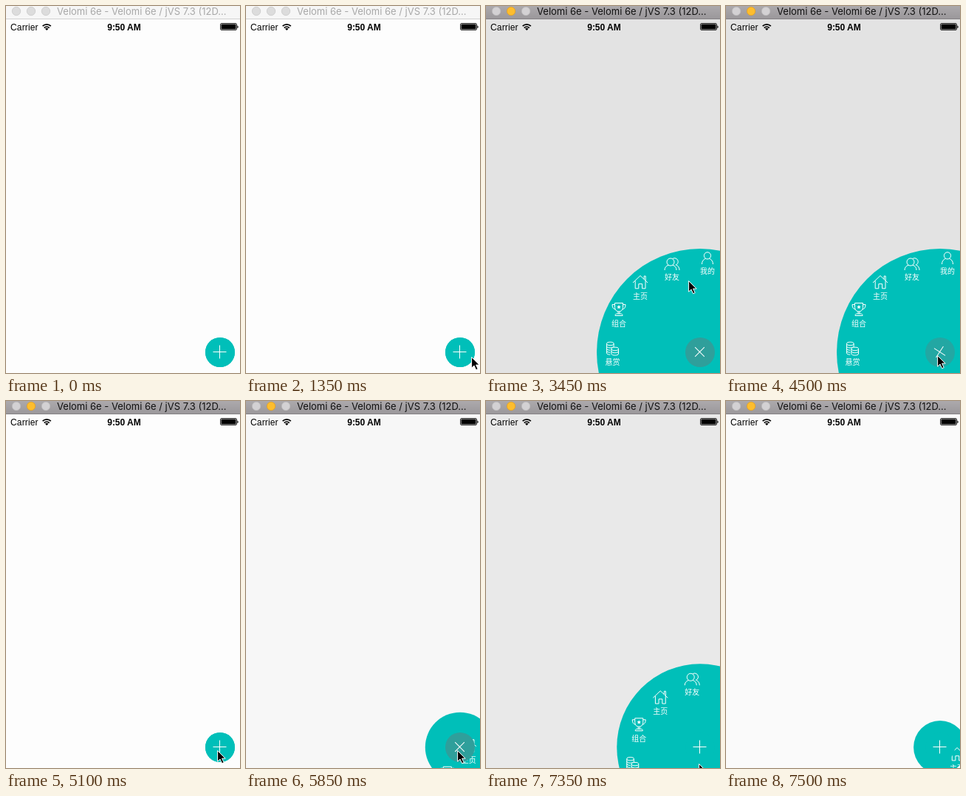
An HTML page that plays this animation: 317 px wide and 496 px high, repeating every 7.6 s.

```html
<!DOCTYPE html>
<html lang="zh">
<head>
<meta charset="utf-8">
<title>Radial menu</title>
<style>
  html, body { margin: 0; width: 100%; height: 100%; overflow: hidden; background: #fdfdfd; }
  svg { display: block; }
  .title { font: 13px Inter, sans-serif; }
  .status { font: 12px "Liberation Sans", Arial, sans-serif; }
  .clock { font-weight: bold; text-anchor: middle; }
  .label { font: 10px "Noto Sans CJK SC", "Noto Sans CJK", sans-serif; fill: #fff; text-anchor: middle; }
  .line { fill: none; stroke: #fff; stroke-width: 1; stroke-linejoin: round; }
</style>
</head>
<body>
<svg width="317" height="496" viewBox="0 0 317 496">
  <defs>
    <linearGradient id="steel" x2="0" y2="1">
      <stop stop-color="#aca9ac"/><stop offset="1" stop-color="#9b989b"/>
    </linearGradient>
    <clipPath id="clip"><circle id="clipDisc" cx="290" cy="468"/></clipPath>

    <g id="me">
      <circle cy="-3.6" r="4.6"/>
      <path d="M-7.5 8C-7.5 4-5.5 1.6-2.6.3M2.6.3C5.5 1.6 7.5 4 7.5 8"/>
    </g>
    <g id="friends">
      <circle cx="-2" cy="-3" r="5"/>
      <path d="M-10 8C-10 4.5-8 2.3-5 1.2M1 1.2C4 2.3 6 4.5 6 8"/>
      <path d="M1-7.6A4.8 4.8 0 1 1 4.6 1.2M6 1.2C8.8 2.6 10 5 10 8"/>
    </g>
    <g id="home">
      <path d="M-10 1L0-8.5L10 1M5.2-4V-8H7.2V-2"/>
      <path d="M-6.8-1.5V8.8H-2.2V2.6H2.6V8.8H7V-1.5"/>
    </g>
    <g id="cup">
      <path d="M-5.5-8.5H5.5V-2.5A5.5 5.5 0 0 1-5.5-2.5ZM-5.5-6.5H-9C-9-2.5-7.5-.5-4.8 0M5.5-6.5H9C9-2.5 7.5-.5 4.8 0"/>
      <path d="M-1 3V6M1 3V6M-5 8.5C-5 6.6-4 6-2.5 6H2.5C4 6 5 6.6 5 8.5Z"/>
      <path d="M0-6L.8-4.2L2.6-4L1.3-2.7L1.7-.8L0-1.8L-1.7-.8L-1.3-2.7L-2.6-4L-.8-4.2Z" fill="#fff" stroke="none"/>
    </g>
    <g id="coins">
      <ellipse cx="-3.2" cy="-6.6" rx="4.8" ry="2.2"/>
      <path d="M-8-6.6V6C-8 7.4-6 8.2-3.2 8.2M1.6-6.6V-2M-8-3.4C-8-.6-2-.6 0-2M-8-.2C-8 1.4-6 2.2-3.2 2.2M-8 3C-8 4.4-6 5.2-3.2 5.2"/>
      <ellipse cx="3.2" cy=".4" rx="4.8" ry="2.2"/>
      <path d="M-1.6.4V7C-1.6 9.8 8 9.8 8 7V.4M-1.6 3.6C-1.6 6.4 8 6.4 8 3.6"/>
    </g>
  </defs>

  <rect width="317" height="496" fill="#fdfdfd"/>

  <g class="status">
    <text x="6" y="32.5" letter-spacing=".15">Carrier</text>
    <text class="clock" x="160" y="32.5">9:50 AM</text>
  </g>
  <g fill="none" stroke="#000" stroke-width="1.7">
    <path d="M49.6 27.2A8 8 0 0 1 60.8 27.2M51.7 29.6A5 5 0 0 1 58.7 29.6"/>
    <path d="M55.2 33L53 30.8A3.1 3.1 0 0 1 57.4 30.8Z" fill="#000" stroke="none"/>
  </g>
  <rect x="290.5" y="23.5" width="22" height="9" rx="1.5" fill="none" stroke="#000" stroke-width=".8"/>
  <rect x="291.5" y="24.5" width="20" height="7" rx=".6"/>
  <path d="M313.4 26.3A2 2 0 0 1 313.4 30Z"/>

  <rect id="shade" y="18" width="317" height="478"/>

  <circle id="disc" cx="290" cy="468" fill="#00bfb9"/>
  <g clip-path="url(#clip)"><g id="items"></g></g>

  <circle id="button" cx="290" cy="468" r="20"/>
  <path id="plus" class="line" d="M-9 0H9M0-9V9"/>

  <rect id="bar" width="317" height="17"/>
  <rect id="rule" y="17" width="317" height="1"/>
  <g id="lights" stroke-width=".8">
    <circle cx="14" cy="7" r="5.7"/><circle cx="34" cy="7" r="5.7"/><circle cx="54" cy="7" r="5.7"/>
  </g>
  <text id="title" class="title" x="69" y="12">Velomi 6e - Velomi 6e / jVS 7.3 (12D...</text>

  <path id="cursor" d="M.6.5V15.2L4 12L6.6 17.8L9.2 16.6L6.6 11.1H11.2Z" stroke="#fff" stroke-width="1"/>
</svg>

<script>
const $ = id => document.getElementById(id);
const LOOP = 7600, STEP = 150;
const CLOSED = 20, OPEN = 140;
const TURN = 150, GROW = 324, GROW_DELAY = 250;

// icon, label, icon centre, label baseline
const ITEMS = [
  ['me', '我的', 300, 341, 362],
  ['friends', '好友', 252, 349, 370],
  ['home', '主页', 209, 373, 396],
  ['cup', '组合', 180, 410, 433],
  ['coins', '悬赏', 171.5, 463, 485]
];
$('items').innerHTML = ITEMS.map(([icon, label, x, y, base]) =>
  `<use href="#${icon}" class="line" x="${x}" y="${y}"/>` +
  `<text class="label" x="${x}" y="${base}">${label}</text>`).join('');

// times at which the button is pressed, opening and closing in turn
const TAPS = [2400, 4450, 5500, 7000];

// time, x, y of the pointer tip
const POINTER = [
  [750, 311, 475], [900, 307, 474], [1050, 304, 474], [1200, 304, 474],
  [1350, 305, 474], [1500, 305, 474], [1650, 302, 475], [2100, 290, 471],
  [2550, 290, 471], [2700, 292, 452], [3000, 293, 352], [3150, 293, 352],
  [3300, 281, 347], [3450, 274, 371], [3600, 272, 384], [3900, 285, 438],
  [4200, 286, 472], [7050, 286, 472], [7200, 287, 477], [7350, 288, 490],
  [7500, 289, 500]
];

const clamp = v => Math.min(1, Math.max(0, v));
const ease = v => v * v * (3 - 2 * v);
const mix = (a, b, k) => a + (b - a) * k;

// 0 when closed, 1 when open
function toggle(t, delay, length) {
  return TAPS.reduce((sum, tap, i) =>
    sum + (i % 2 ? -1 : 1) * ease(clamp((t - tap - delay) / length)), 0);
}

function pointerAt(t) {
  const i = POINTER.findIndex(p => p[0] > t);
  if (i === 0) return null;
  if (i < 0) return POINTER[POINTER.length - 1].slice(1);
  const a = POINTER[i - 1], b = POINTER[i];
  const k = (t - a[0]) / (b[0] - a[0]);
  return [mix(a[1], b[1], k), mix(a[2], b[2], k)];
}

function drawBar(active) {
  $('bar').setAttribute('fill', active ? 'url(#steel)' : '#f6f6f6');
  $('rule').setAttribute('fill', active ? '#858285' : '#d2d2d2');
  $('title').setAttribute('fill', active ? '#111' : '#a8a8a8');
  [...$('lights').children].forEach((light, i) => {
    const yellow = active && i === 1;
    light.setAttribute('fill', yellow ? '#fdbd2e' : active ? '#d3d1d3' : '#dcdcdc');
    light.setAttribute('stroke', yellow ? '#e0a028' : active ? '#bdbbbd' : '#cacaca');
  });
}

function draw(t) {
  const turn = toggle(t, 0, TURN);
  const grow = toggle(t, GROW_DELAY, GROW);
  const radius = mix(CLOSED, OPEN, grow);
  const shift = OPEN - radius;

  drawBar(t >= 2550);
  $('shade').setAttribute('opacity', 0.1 * grow);
  $('disc').setAttribute('r', radius);
  $('clipDisc').setAttribute('r', radius);
  $('items').setAttribute('transform', `translate(${shift} ${shift})`);

  const rgb = [[0, 47], [191, 159], [185, 155]].map(([a, b]) => Math.round(mix(a, b, turn)));
  $('button').setAttribute('fill', `rgb(${rgb})`);
  $('plus').setAttribute('transform', `translate(289.5 467.5) rotate(${45 * turn})`);

  const tip = pointerAt(t);
  $('cursor').setAttribute('visibility', tip ? 'visible' : 'hidden');
  if (tip) $('cursor').setAttribute('transform', `translate(${tip})`);
}

const start = performance.now();
function tick() {
  const t = (performance.now() - start) % LOOP;
  draw(Math.floor(t / STEP) * STEP);
  requestAnimationFrame(tick);
}
tick();
</script>
</body>
</html>
```
